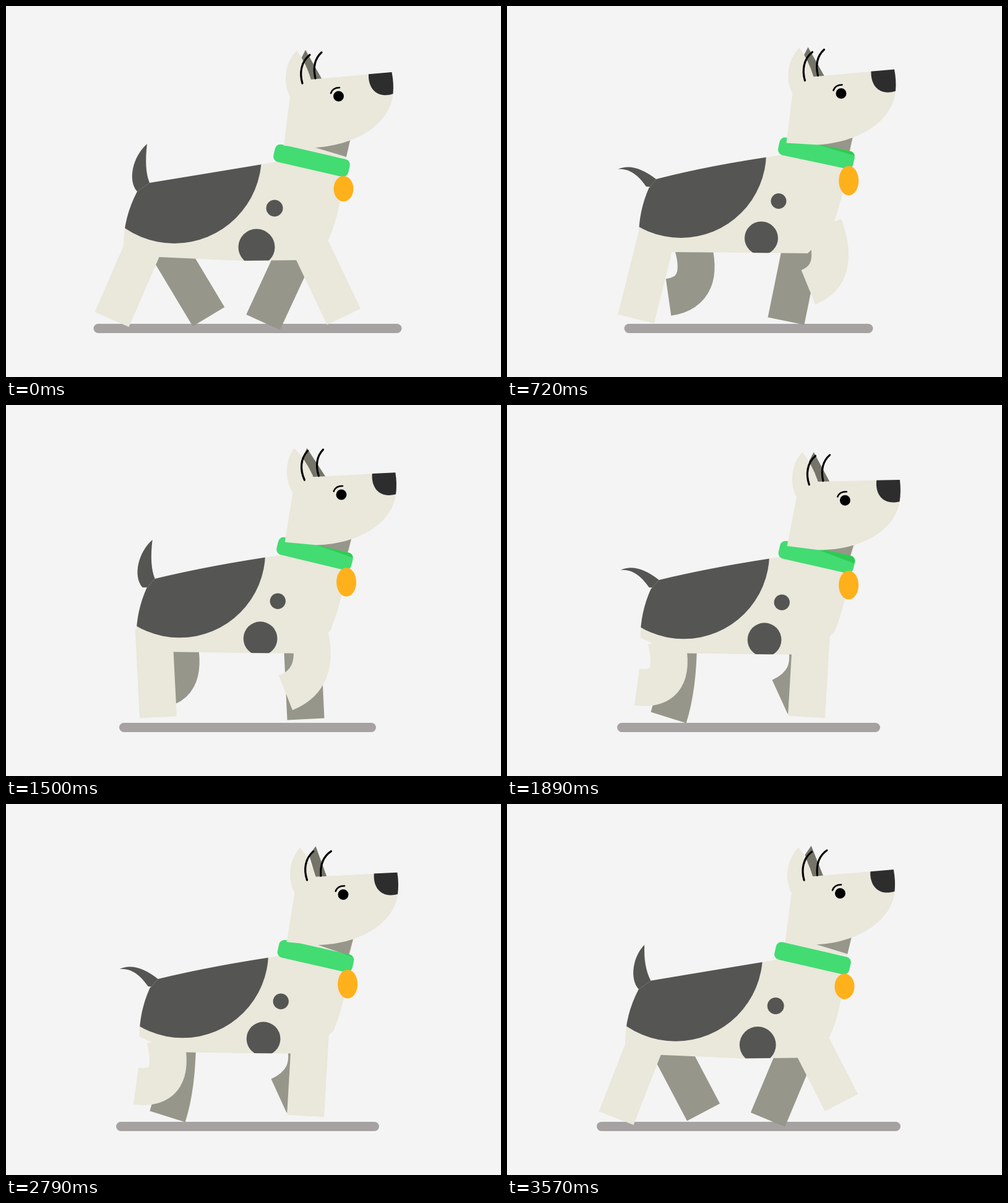
Write an HTML page with a canvas that moves like this. It is 800x600 px and loops after 3600 ms.

```html
<!DOCTYPE html>
<html>
<head>
<meta charset="utf-8">
<style>
  html, body { margin: 0; width: 800px; height: 600px; overflow: hidden; background: #f4f4f4; }
  canvas { display: block; }
</style>
</head>
<body>
<canvas id="stage" width="800" height="600"></canvas>
<script>
const ctx = document.getElementById('stage').getContext('2d');
const CREAM = '#eae7db', SHADE = '#96968a', DARK = '#555553';
const STEP = 30, FRAMES = 120, WALK = 59, STRIDE = 30;
const mix = (a, b, t) => a + (b - a) * t;

// Walk poses, keyed by position within one stride.
const strideKeys = [0, 1, 4, 9, 15, 16, 20, 24];
// crouch, body x, body y, collar x, collar y, collar angle, floor width
const bodyPoses = [
  [0, 0, 0, 494, 250, 13, 498],
  [.04, 0, 0, 494, 249.5, 13, 491],
  [.85, 6, 2, 500.5, 246, 12.8, 425],
  [1, 2, 0, 500, 239, 12, 400],
  [0, 1, 0, 498, 250.5, 15, 498],
  [.12, 1, 0, 498.5, 250, 15.5, 495],
  [.85, 1, 0, 499, 240.5, 13.5, 415],
  [1, 0, 0, 500, 238, 12, 402]
];
// A straight leg gives its foot; a bent leg gives foot, knee and hip.
const legs = {
  farBack: { hip: [257, 268], poses: [
    [327.5, 502.5], [317.5, 498.5], [261, 505.5, 277, 455, 277, 380], [238, 506],
    [168, 501], [172.5, 498.5], [235, 460, 298, 463, 278, 380], [261, 471, 324, 462, 298, 380]] },
  farFront: { hip: [474, 479], poses: [
    [415.5, 511.5], [421.5, 510.5], [441, 472, 500, 445, 482, 380], [475, 458, 527, 436, 500, 360],
    [545, 508], [540, 505.5], [484.5, 508], [451, 509.5]] },
  nearBack: { hip: [224, 242], poses: [
    [171, 507], [176.5, 508], [210, 456, 278, 465, 257, 380], [232, 468, 294, 460, 262, 380],
    [316, 506], [308.5, 503.5], [246, 505], [208.5, 506]] },
  nearFront: { hip: [490, 492], poses: [
    [546, 502.5], [540.5, 483], [484, 504.5], [458, 508],
    [403, 500], [405.5, 496.5], [452, 465.5, 509, 443, 490, 368], [487, 455, 541, 433, 512, 355]] }
};
for (const leg of Object.values(legs)) {
  leg.poses = leg.poses.map((p, i) => {
    if (p.length > 2) return p;
    const k = bodyPoses[i][0], [fx, fy] = p;
    const hx = mix(fx, mix(...leg.hip, k), 1.1), hy = mix(fy, mix(385, 372, k), 1.1);
    return [fx, fy, (fx + hx) / 2, (fy + hy) / 2, hx, hy];
  });
}
// eye x, eye y, tilt, near ear, far ear
const headKeys = [0, 24, 34, 50, 75, 93, 119];
const headPoses = [
  [43.5, 0, 0, 0, 0], [40, -.5, 0, 0, 0], [44.5, -4.8, 2.1, -5, -6], [43, 1.7, 2.1, -12, -5],
  [48.5, 7, 5.5, -3, 1], [44.5, -2.3, 2.1, -5, 6], [44.5, -1.3, .4, 0, 6]
];

// Cyclic monotone cubic interpolation between poses.
function pose(keys, poses, period, t) {
  const n = keys.length;
  const key = i => keys[(i + n) % n] + Math.floor(i / n) * period;
  let i = n - 1;
  while (keys[i] > t) i--;
  const span = key(i + 1) - key(i), u = (t - key(i)) / span;
  return poses[0].map((_, c) => {
    const val = j => poses[(j + n) % n][c];
    const slope = j => (val(j + 1) - val(j)) / (key(j + 1) - key(j));
    const tangent = j => {
      const a = slope(j - 1), b = slope(j);
      return a * b > 0 ? 2 * a * b / (a + b) : 0;
    };
    const a = val(i), b = val(i + 1), s = u * u * (3 - 2 * u);
    return mix(a, b, s) + span * u * (1 - u) * ((1 - u) * tangent(i) - u * tangent(i + 1));
  });
}

function fill(path, color) {
  ctx.fillStyle = color;
  ctx.fill(new Path2D(path));
}
function stroke(path, color, width, cap = 'round') {
  ctx.strokeStyle = color;
  ctx.lineWidth = width;
  ctx.lineCap = cap;
  ctx.stroke(new Path2D(path));
}
function ellipse(x, y, rx, ry, color) {
  ctx.fillStyle = color;
  ctx.beginPath();
  ctx.ellipse(x, y, rx, ry, 0, 0, 7);
  ctx.fill();
}
function at(x, y, degrees, draw) {
  ctx.save();
  ctx.translate(x, y);
  ctx.rotate(degrees * Math.PI / 180);
  draw();
  ctx.restore();
}
const around = (x, y, degrees, draw) =>
  at(x, y, degrees, () => { ctx.translate(-x, -y); draw(); });

function drawLeg(name, t, color) {
  const [fx, fy, kx, ky, hx, hy] = pose(strideKeys, legs[name].poses, STRIDE, t);
  stroke(`M${hx},${hy}Q${kx},${ky} ${fx},${fy}`, color, 60, 'butt');
}

function drawTail(x, y, wag) {
  const p = (ux, uy, dx, dy) => `${x + mix(ux, dx, wag)},${y + mix(uy, dy, wag)} `;
  fill('M' + p(0, 0, 0, 0) + 'Q' + p(-9, -22, -36, -28) + p(-4, -63, -62, -16) +
    'C' + p(-27, -43, -40, -18) + p(-36, -4, -26, -2) + p(-20, 14, -16, 12) +
    `L${x + 8},${y + 14}Z`, DARK);
}

function drawBody(k, dx, dy) {
  const p = (ex, ey, cx, cy) => `${mix(ex, cx, k) + dx},${mix(ey, cy, k) + dy} `;
  const spot = (ex, ey, er, cx, cy, cr) => {
    const r = mix(er, cr, k);
    ellipse(mix(ex, cx, k) + dx, mix(ey, cy, k) + dy, r, r, DARK);
  };
  const outline = 'M' + p(232, 286, 241, 280) + 'Q' + p(330, 270, 330, 257) + p(438, 252, 444, 241) +
    'L' + p(545, 270, 550, 258) + 'Q' + p(541, 335, 544, 310) + p(521, 378, 524, 362) +
    'L' + p(470, 411, 486, 400) + 'L' + p(380, 412, 390, 399) + 'L' + p(247, 406, 268, 398) +
    'L' + p(190, 387, 213, 372) + 'Q' + p(190, 342, 213, 332) + p(212, 300, 229, 295) + 'Z';
  fill(outline, CREAM);
  ctx.save();
  ctx.clip(new Path2D(outline));
  spot(272, 243, 141, 281, 237, 138);
  spot(434, 327, 13.5, 439, 315.5, 12.5);
  spot(405, 390, 29.5, 411, 375.5, 27);
  ctx.restore();
}

function drawHead(nearEar, farEar) {
  around(500, 119, farEar * 1.2, () => fill('M484,71L476,87L492,120L511,119Z', '#757469'));
  around(475, 135, nearEar * .87, () =>
    fill('M470,72C450,92 447,125 459,146L494,132L493,119Q485,92 470,72Z', CREAM));
  fill('M459,146L491,119L623.5,107Q627,125 625.5,142C622,185 575,224 500,229L449,226Z', CREAM);
  fill('M586,110.3L623.5,107Q627,125 625.5,142C601,150 585,135 586,110.3Z', '#2d2d2d');
  around(475, 135, nearEar * .87, () => stroke('M491,79C477,90 474,108 479,125', '#000', 3.2));
  around(500, 119, farEar * 1.2, () => stroke('M510,75C499,85 496,100 500,117', '#000', 3.2));
  ellipse(537.5, 146, 8.5, 8.5, '#000');
  stroke('M525,141Q528,132 539,132', '#000', 2.6);
}

function draw(frame) {
  const walk = frame % WALK, t = walk % STRIDE;
  const [k, dx, dy, cx, cy, turn, floor] = pose(strideKeys, bodyPoses, STRIDE, t);
  const [hx, hy, tilt, nearEar, farEar] = pose(headKeys, headPoses, FRAMES, frame);
  const eyeX = cx + hx, eyeY = cy - 104 + 8 * k + hy;
  const inHead = part => at(eyeX, eyeY, tilt, () => { ctx.translate(-537.5, -146); part(); });
  const wag = (1 - Math.cos(walk * Math.PI / 5)) / 1.81;

  ctx.fillStyle = '#f4f4f4';
  ctx.fillRect(0, 0, 800, 600);
  stroke(`M${398 - floor / 2},521.5H${383 + floor / 2}`, '#a6a2a2', 15);
  drawLeg('farBack', t, SHADE);
  drawLeg('farFront', t, SHADE);
  drawTail(mix(232, 241, k) + dx, mix(286, 280, k) + dy, wag);
  drawLeg('nearBack', t, CREAM);
  drawLeg('nearFront', t, CREAM);
  drawBody(k, dx, dy);

  // Neck, with the shadow under the jaw
  fill(`M${eyeX - 78},${eyeY + 5}L${eyeX + 16},${eyeY + 70}L${cx + 56},${cy - 4}L${cx - 45},${cy - 20}Z`, CREAM);
  inHead(() => fill('M500,229L520,205L559,205L550,244Z', SHADE));

  const collar = new Path2D();
  collar.roundRect(-62, -14.5, 124, 29, 9);
  at(cx, cy, turn, () => { ctx.fillStyle = '#42dc72'; ctx.fill(collar); });
  ctx.save();
  const placed = new Path2D();
  placed.addPath(collar, new DOMMatrix().translate(cx, cy).rotate(turn));
  ctx.clip(placed);
  inHead(() => fill('M500,229L575,205L570,250Z', '#2fca54'));
  ctx.restore();

  const a = (turn - 13) * Math.PI / 180, c = Math.cos(a), s = Math.sin(a);
  ellipse(cx + 51.5 * c - 45.5 * s, cy + 45.5 * c + 51.5 * s, 16, 20.5 + 3.3 * k, '#ffb11b');
  inHead(() => drawHead(nearEar, farEar));
}

function tick() {
  draw(Math.floor(performance.now() / STEP) % FRAMES);
  requestAnimationFrame(tick);
}
tick();
</script>
</body>
</html>
```
